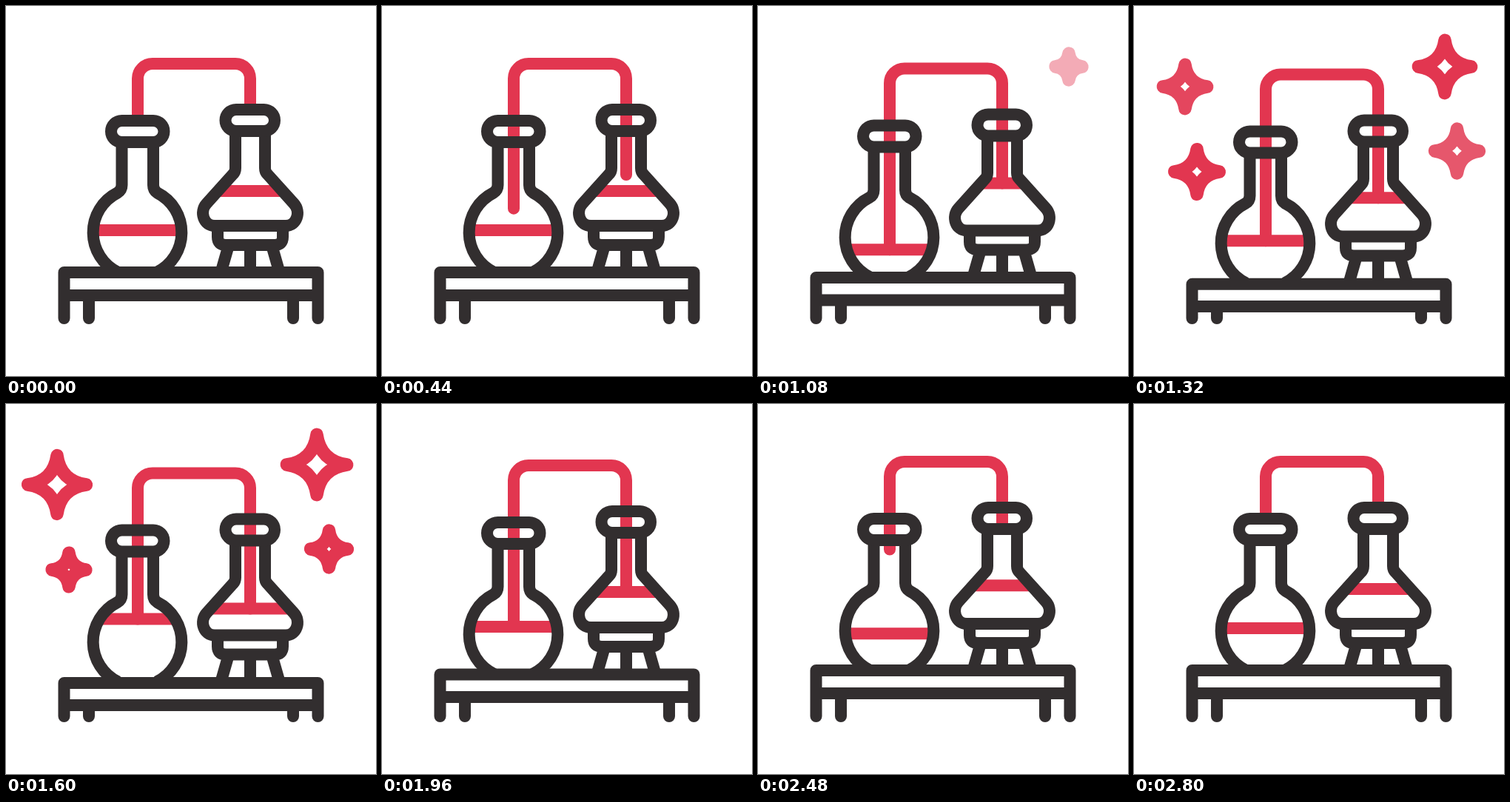
These frames come from a looping animation (500 by 500 pixels, 3 s). An HTML page:

```html
<!DOCTYPE html>
<html lang="en">
<head>
<meta charset="utf-8">
<title>Distillation</title>
<style>
  html, body { margin: 0; width: 100%; height: 100%; overflow: hidden; background: #fff; }
  svg { display: block; width: 100vw; height: 100vh; }
  path { fill: none; stroke-width: 16; stroke-linejoin: round; }
  .ink { stroke: #322e2f; }
  .red { stroke: #e23650; }
  .round { stroke-linecap: round; }
  #stars path { stroke-width: 17.5; }
</style>
</head>
<body>
<svg viewBox="0 0 500 500">
  <defs>
    <clipPath id="inRound"><path d="M156.5 184V242Q156.5 249 150.5 252.5A60 60 0 0 0 151.5 360H203.5A60 60 0 0 0 204.5 252.5Q199 249 199 242V184Z"/></clipPath>
    <clipPath id="inCone"><path d="M310 169V219Q310 224 307 227L271 267C261 278 267 297 282 297H378C393 297 399 278 389 267L353 227Q350 224 350 219V169Z"/></clipPath>
  </defs>
  <g id="stars"></g>
  <g id="rig">
    <path id="pipe" class="red round"/>
    <g clip-path="url(#inRound)"><path id="liquidL" class="red"/></g>
    <g clip-path="url(#inCone)"><path id="liquidR" class="red"/></g>
    <g class="ink">
      <!-- round flask -->
      <path d="M156.5 184V242Q156.5 249 150.5 252.5A60 60 0 0 0 151.5 360M203.5 360A60 60 0 0 0 204.5 252.5Q199 249 199 242V184"/>
      <path d="M156.5 155H199A14.5 14.5 0 0 1 199 184H156.5A14.5 14.5 0 0 1 156.5 155Z"/>
      <!-- conical flask -->
      <path d="M310 169V219Q310 224 307 227L271 267C261 278 267 297 282 297H378C393 297 399 278 389 267L353 227Q350 224 350 219V169"/>
      <path d="M311 140H348.5A14.5 14.5 0 0 1 348.5 169H311A14.5 14.5 0 0 1 311 140Z"/>
      <!-- burner -->
      <path d="M286 297V312Q286 323 297 323H363Q374 323 374 312V297M301 323L291 358M330 323V360M359 323L369 358"/>
    </g>
  </g>
  <path id="table" class="ink round"/>
</svg>
<script>
const LOOP = 3000, STEP = 40, STAR_LIFE = 850;
const $ = id => document.getElementById(id);
const clamp = x => Math.min(1, Math.max(0, x));
const lerp = (a, b, k) => a + (b - a) * k;
const part = (t, from, to) => clamp((t - from) / (to - from));
const ease = (t, from, to) => (1 - Math.cos(Math.PI * part(t, from, to))) / 2;

// The rig sinks onto its legs and comes back up
const sink = t => 17 * (ease(t, 780, 1480) - ease(t, 1480, 2240));
// The pipe ends shoot down into the flasks and are drawn out again
const dip = t => 1 - (1 - part(t, 200, 680)) ** 2.4 - ease(t, 2240, 2620);

// The liquids swing between these turning points
const turns = [800, 1090, 1600, 2340, 2660, 2800];
const slosh = (t, swings) => swings.reduce((y, s, i) =>
  i ? y + (s - swings[i - 1]) * ease(t, turns[i - 1], turns[i]) : s, 0);
const levelL = t => 303 + slosh(t, [0, 20, -28, 16, -6, 0]);
const levelR = t => 250 + slosh(t, [0, -17, 11, -14, 9, 0]);

const grow = age => 42 * (1 - Math.exp(-age / 180));
const pulse = age => 30.3 * Math.max(0, Math.cos((age - 260) / 363));
const fade = age => clamp(Math.min(age / 240, (STAR_LIFE - age) / 160));

const stars = [
  [420, 82, 980, grow], [69, 109, 1100, grow],
  [436.5, 196, 1120, pulse], [85, 224, 1080, pulse]
].map(([x, y, start, size]) => {
  const el = document.createElementNS('http://www.w3.org/2000/svg', 'path');
  el.setAttribute('class', 'red');
  el.setAttribute('transform', `translate(${x} ${y})`);
  $('stars').append(el);
  return { el, start, size };
});

function starPath(h) {
  const c = h * .12;
  return `M0 ${-h}Q${c} ${-c} ${h} 0Q${c} ${c} 0 ${h}Q${-c} ${c} ${-h} 0Q${-c} ${-c} 0 ${-h}Z`;
}

function draw(t) {
  const dy = sink(t), k = dip(t), l = levelL(t), r = levelR(t);
  const top = 360 + dy * 1.06, shelf = 391 + dy;
  $('rig').setAttribute('transform', `translate(0 ${dy * .97})`);
  $('table').setAttribute('d',
    `M78.5 422V${top}H421.5V422M78.5 ${shelf}H421.5M112 ${shelf}V422M388 ${shelf}V422`);
  $('liquidL').setAttribute('d', `M100 ${l}H256`);
  $('liquidR').setAttribute('d', `M250 ${r}H410`);
  $('pipe').setAttribute('d',
    `M178 ${lerp(148, l, k)}V98A20 20 0 0 1 198 78H310A20 20 0 0 1 330 98V${lerp(134, r, k)}`);
  for (const { el, start, size } of stars) {
    const age = Math.min(STAR_LIFE, Math.max(0, t - start));
    el.setAttribute('d', starPath(size(age)));
    el.setAttribute('opacity', fade(age));
  }
}

const origin = performance.now();
function tick() {
  const t = (performance.now() - origin) % LOOP;
  draw(Math.floor(t / STEP) * STEP);
  requestAnimationFrame(tick);
}
tick();
</script>
</body>
</html>
```
